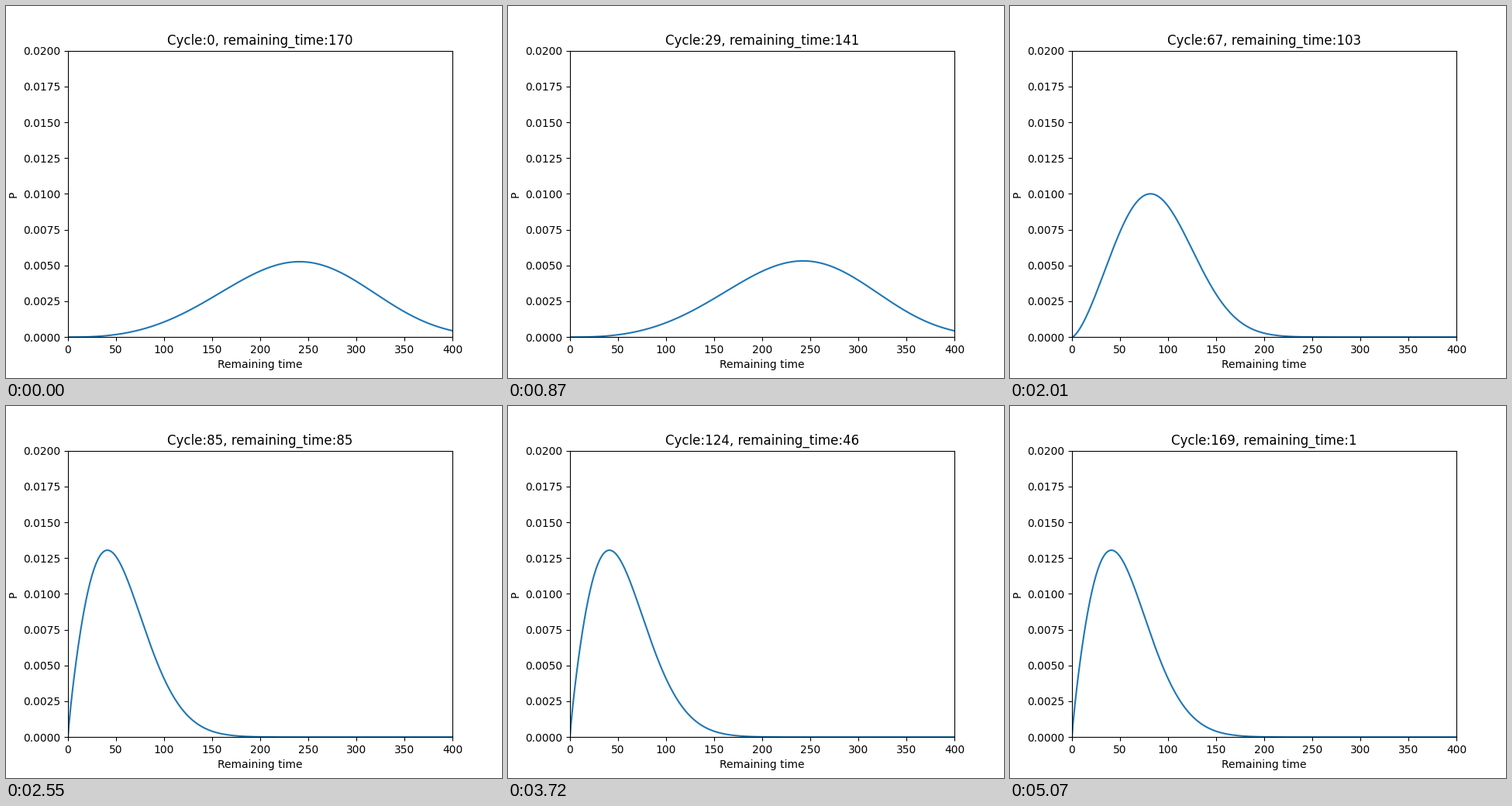
A matplotlib script that plays this animation: 640x480 px, repeating every 5100 ms.

```python
import numpy as np
import matplotlib.pyplot as plt
from matplotlib.animation import FuncAnimation

CYCLES = 170
INTERVAL = 30  # ms

# Weibull scale and shape: healthy plateau, then worn-out plateau
SCALE_NEW, SCALE_WORN = 264.5, 62.57
SHAPE_NEW, SHAPE_WORN = 3.67, 1.846
WEAR_START, WEAR_SPAN = 38.7, 45.9


def weibull_params(cycle):
    settle = np.exp(-cycle / 4)
    t = np.clip((cycle - WEAR_START) / WEAR_SPAN, 0, 1)
    wear = t * t * (3 - 2 * t)
    scale = SCALE_NEW * (SCALE_WORN / SCALE_NEW) ** wear - settle
    shape = SHAPE_NEW + (SHAPE_WORN - SHAPE_NEW) * wear
    shape += 32.5 * t**2 * (1 - t) ** 6 - 0.056 * settle
    return scale, shape


def weibull_pdf(x, scale, shape):
    u = x / scale
    return shape / scale * u ** (shape - 1) * np.exp(-(u**shape))


plt.rcParams["font.family"] = "DejaVu Sans"
fig, ax = plt.subplots(figsize=(6.4, 4.8), dpi=100)
x = np.linspace(0, 400, 401)
line, = ax.plot(x, np.zeros_like(x), color="#1f77b4", lw=1.5)
ax.set(xlim=(0, 400), ylim=(0, 0.02), xlabel="Remaining time", ylabel="P")
title = ax.set_title("")


def update(cycle):
    line.set_ydata(weibull_pdf(x, *weibull_params(cycle)))
    title.set_text(f"Cycle:{cycle}, remaining_time:{CYCLES - cycle}")
    return line, title


anim = FuncAnimation(fig, update, frames=CYCLES, interval=INTERVAL,
                     repeat=True, repeat_delay=0)
plt.show()
```
